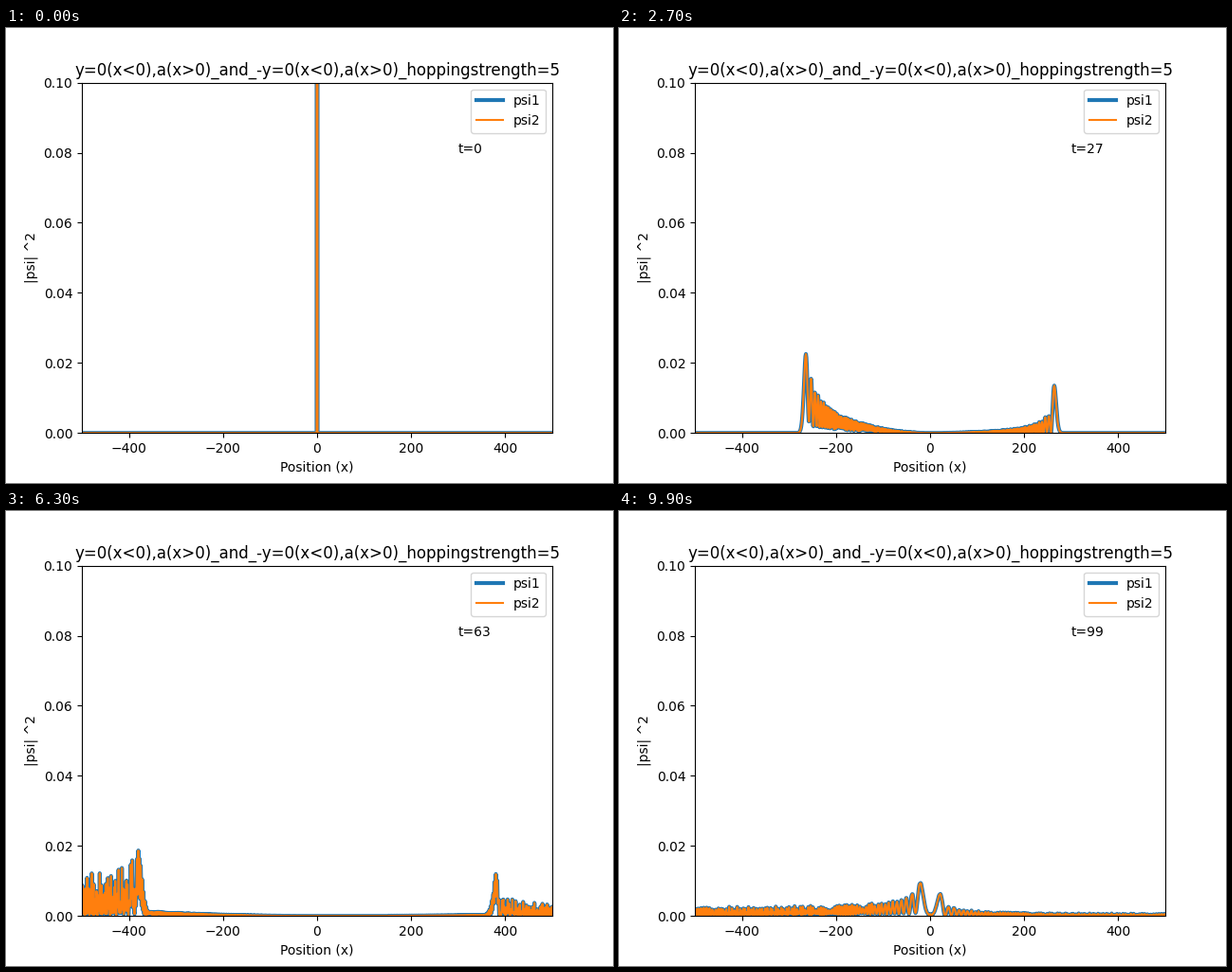
These frames come from a looping animation (640x480 px, 10000 ms). A matplotlib script:

```python
import numpy as np
import matplotlib.pyplot as plt
from matplotlib.animation import FuncAnimation

HALF = 500       # chain runs from -HALF to HALF with hard ends
HOP = 5.0        # hopping strength
STEP = 10.0      # potential for x > 0
FRAMES = 100

x = np.arange(-HALF, HALF + 1)


def make_density(step):
    """Return t -> |psi|^2 for a particle released at x = 0."""
    bond = np.full(x.size - 1, -HOP)
    ham = np.diag(np.where(x > 0, step, 0.0)) + np.diag(bond, 1) + np.diag(bond, -1)
    energy, modes = np.linalg.eigh(ham)
    start = modes[HALF]

    def density(t):
        phase = energy * t
        re = modes @ (start * np.cos(phase))
        im = modes @ (start * np.sin(phase))
        return re**2 + im**2

    return density


densities = [make_density(STEP), make_density(-STEP)]

plt.rcParams["font.family"] = "DejaVu Sans"
fig, ax = plt.subplots(figsize=(6.4, 4.8), dpi=100)
ax.set_xlim(-500, 500)
ax.set_ylim(0, 0.1)
ax.set_xlabel("Position (x)")
ax.set_ylabel("|psi| ^2")
ax.set_title("y=0(x<0),a(x>0)_and_-y=0(x<0),a(x>0)_hoppingstrength=5")

lines = [
    ax.plot(x, densities[0](0), color="C0", lw=3, label="psi1")[0],
    ax.plot(x, densities[1](0), color="C1", lw=1.5, label="psi2")[0],
]
clock = ax.text(300, 0.08, "t=0")
ax.legend(loc="upper right")


def update(t):
    for line, density in zip(lines, densities):
        line.set_ydata(density(t))
    clock.set_text(f"t={t}")
    return [*lines, clock]


anim = FuncAnimation(fig, update, frames=FRAMES, interval=100,
                     repeat=True, repeat_delay=0, blit=False)
plt.show()
```
